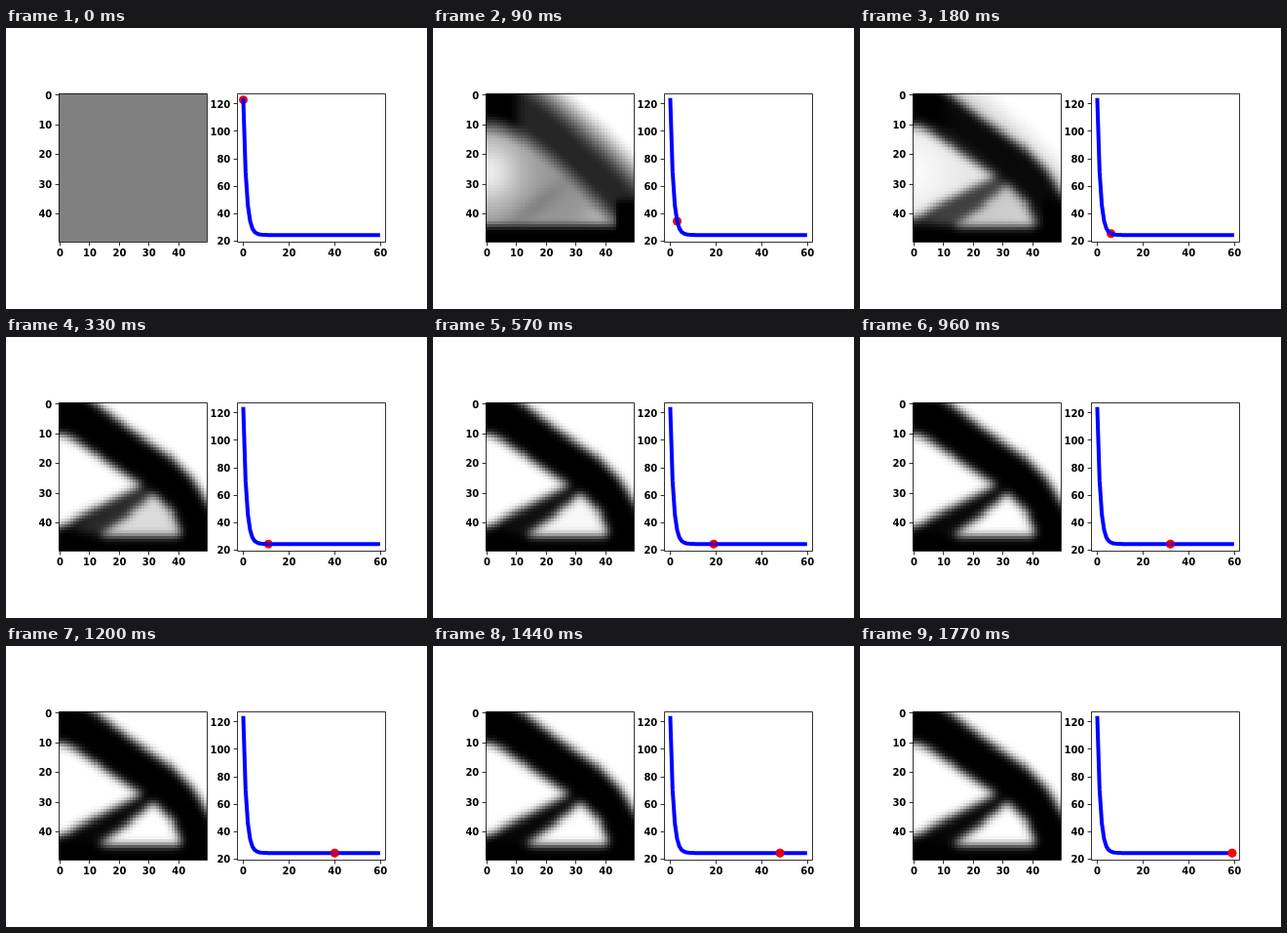
Write an HTML page with a canvas that moves like this. It is 432 px wide and 288 px high and loops after 1.8 s.

```html
<!DOCTYPE html>
<html lang="en">
<head>
<meta charset="utf-8">
<title>Beam layout and loss</title>
<style>
  html, body { margin: 0; width: 100%; height: 100%; overflow: hidden; background: #fff; }
  canvas { position: absolute; left: 54px; top: 67px; width: 152px; height: 152px; }
  svg { position: absolute; left: 0; top: 0; }
  text { font: bold 10px "DejaVu Sans", sans-serif; fill: #000; }
  .axis { fill: none; stroke: #000; stroke-width: .8; }
  #curve { fill: none; stroke: #00f; stroke-width: 4; stroke-linejoin: round; stroke-linecap: square; }
  .dot { fill: #f00; }
</style>
</head>
<body>
<canvas id="beam" width="152" height="152"></canvas>
<svg width="432" height="288" viewBox="0 0 432 288">
  <circle class="dot" r="4.5"/>
  <path id="curve"/>
  <circle class="dot" r="4.5"/>
  <g id="axes"></g>
</svg>
<script>
const STEPS = 60, STEP_MS = 30, N = 50, PAD = 6, CELL = 152.18 / N;
const clamp = (v, lo, hi) => Math.min(hi, Math.max(lo, v));
const mix = (a, b, t) => a + (b - a) * t;
const smooth = (lo, hi, v) => {
  const t = clamp((v - lo) / (hi - lo), 0, 1);
  return t * t * (3 - 2 * t);
};

// ---- axes and loss curve ----
const axes = document.getElementById('axes');
const add = (tag, attrs, label) => {
  const el = document.createElementNS('http://www.w3.org/2000/svg', tag);
  for (const key in attrs) el.setAttribute(key, attrs[key]);
  if (label !== undefined) el.textContent = label;
  axes.append(el);
};
const snap = v => Math.floor(v) + .5;
const line = d => add('path', { class: 'axis', d });

function xTick(x, label) {
  line(`M${snap(x)} 219.5v3.9`);
  add('text', { x, y: 234, 'text-anchor': 'middle' }, label);
}
function yTick(left, y, label) {
  line(`M${left} ${snap(y)}h-3.9`);
  add('text', { x: left - 7.2, y: y + 3.7, 'text-anchor': 'end' }, label);
}

const plotX = i => 243.5 + i * 2.3448;
const plotY = v => 218.2 - (v - 20) * 1.403;
const loss = i => 24.3 + 98.7 * Math.exp(-.76 * i);

line('M54.5 67.5h152v152h-152z');
line('M237.5 67.5h152v152h-152z');
for (let v = 0; v < N; v += 10) {
  xTick(54 + (v + .5) * CELL, v);
  yTick(54.5, 67.4 + (v + .5) * CELL, v);
}
for (let v = 0; v <= 60; v += 20) xTick(plotX(v), v);
for (let v = 20; v <= 120; v += 20) yTick(237.5, plotY(v), v);

const points = Array.from({ length: STEPS }, (_, i) =>
  plotX(i).toFixed(2) + ' ' + plotY(loss(i)).toFixed(2));
document.getElementById('curve').setAttribute('d', 'M' + points.join('L'));

// ---- beam: brightness fields on an N x N grid ----
const OUTER = [[0, -8], [12, 0], [22, 7.5], [31.6, 14], [38, 18.5], [42, 22],
  [46, 27], [50, 33.3], [57, 44], [57, -8]];
const LEFT = [[-8, 11], [3, 11.2], [12, 17], [18.5, 21.8], [28.5, 28], [15, 34.6], [2, 41.3], [-8, 43]];
const INNER = [[32.5, 30.5], [38, 36], [41.5, 44.9], [13, 44.9], [24, 37.5]];
const BRACE = [[28, 28.5], [32, 31], [13, 44], [4, 43]];

function inside(poly, x, y) {
  let hit = false;
  poly.forEach(([ax, ay], k) => {
    const [bx, by] = poly[(k + 1) % poly.length];
    if ((ay > y) !== (by > y) && x < ax + (y - ay) * (bx - ax) / (by - ay)) hit = !hit;
  });
  return hit;
}

const grid = fn => Array.from({ length: N * N }, (_, k) => fn(k % N, Math.floor(k / N)));
const kernel = Array.from({ length: 2 * PAD + 1 }, (_, k) =>
  Math.exp(-((k - PAD) ** 2) / (2 * 1.45 ** 2)));
const kernelSum = kernel.reduce((a, b) => a + b);

// Soft-edged white regions cut out of solid material.
function layout(inner, brace) {
  const size = N + 2 * PAD;
  const raw = Array.from({ length: size * size }, (_, k) => {
    const x = k % size - PAD + .5, y = Math.floor(k / size) - PAD + .5;
    if (inside(OUTER, x, y) || inside(LEFT, x, y)) return 1;
    if (inside(INNER, x, y)) return inner;
    return inside(BRACE, x, y) ? brace : 0;
  });
  const blur = (src, stride) => src.map((_, k) =>
    kernel.reduce((sum, w, j) => sum + w * (src[k + (j - PAD) * stride] || 0), 0) / kernelSum);
  const soft = blur(blur(raw, 1), size);
  return grid((x, y) => soft[(y + PAD) * size + x + PAD]);
}

// Blurry first guess: a dark arch over a grey web.
const early = grid((x, y) => {
  const slope = .6 + .011 * x;
  const d = (y - (-2.5 + .6 * x + .0055 * x * x)) / Math.hypot(1, slope);
  const arch = 38 * smooth(7, 14, x);
  const web = 148 + 88 * Math.exp(-((x / 12) ** 2) - ((y - 26) / 12) ** 2)
    + 24 * Math.exp(-(((x - 37) / 6) ** 2) - ((y - 41) / 4) ** 2)
    - 22 * Math.exp(-(((y - 48 + .65 * x) / 4) ** 2) - ((x - 16) / 11) ** 2);
  const start = 2 + 5 * Math.exp(-x / 8);
  let g = d < 0
    ? mix(arch, 255, smooth(2.5, 16, -d))
    : mix(arch, web, smooth(start, start + 8, d));
  g *= 1 - smooth(41.5, 46.5, y);
  g *= 1 - smooth(42.5, 44.5, x) * smooth(33, 38, y);
  return g / 255;
});
const middle = layout(.86, .17);
const settled = layout(1, .03);

function brightness(i, k) {
  const half = 128 / 255;
  if (i <= 3) return half + clamp(early[k] - half, -.2 * i, .2 * i);
  const late = mix(middle[k], settled[k], 1 - Math.exp(-Math.max(0, i - 11) / 5));
  return i < 11 ? mix(early[k], late, (1 - Math.exp(-(i - 3) / 2.2)) / (1 - Math.exp(-8 / 2.2))) : late;
}

// ---- playback ----
const ctx = document.getElementById('beam').getContext('2d');
const tile = document.createElement('canvas');
tile.width = tile.height = N;
const tileCtx = tile.getContext('2d');
const pixels = tileCtx.createImageData(N, N);
const [under, over] = document.querySelectorAll('.dot');
ctx.imageSmoothingEnabled = false;

function draw(i) {
  for (let k = 0; k < N * N; k++) {
    const g = Math.round(255 * clamp(brightness(i, k), 0, 1));
    pixels.data.set([g, g, g, 255], k * 4);
  }
  tileCtx.putImageData(pixels, 0, 0);
  ctx.drawImage(tile, 0, 0, 152, 152);
  for (const dot of [under, over]) {
    dot.setAttribute('cx', plotX(i));
    dot.setAttribute('cy', plotY(loss(i)));
  }
  over.setAttribute('opacity', i / (STEPS - 1));
}

let shown = 0;
const begin = performance.now();
function tick() {
  const i = Math.floor((performance.now() - begin) / STEP_MS) % STEPS;
  if (i !== shown) draw(shown = i);
  requestAnimationFrame(tick);
}
draw(0);
requestAnimationFrame(tick);
</script>
</body>
</html>
```
